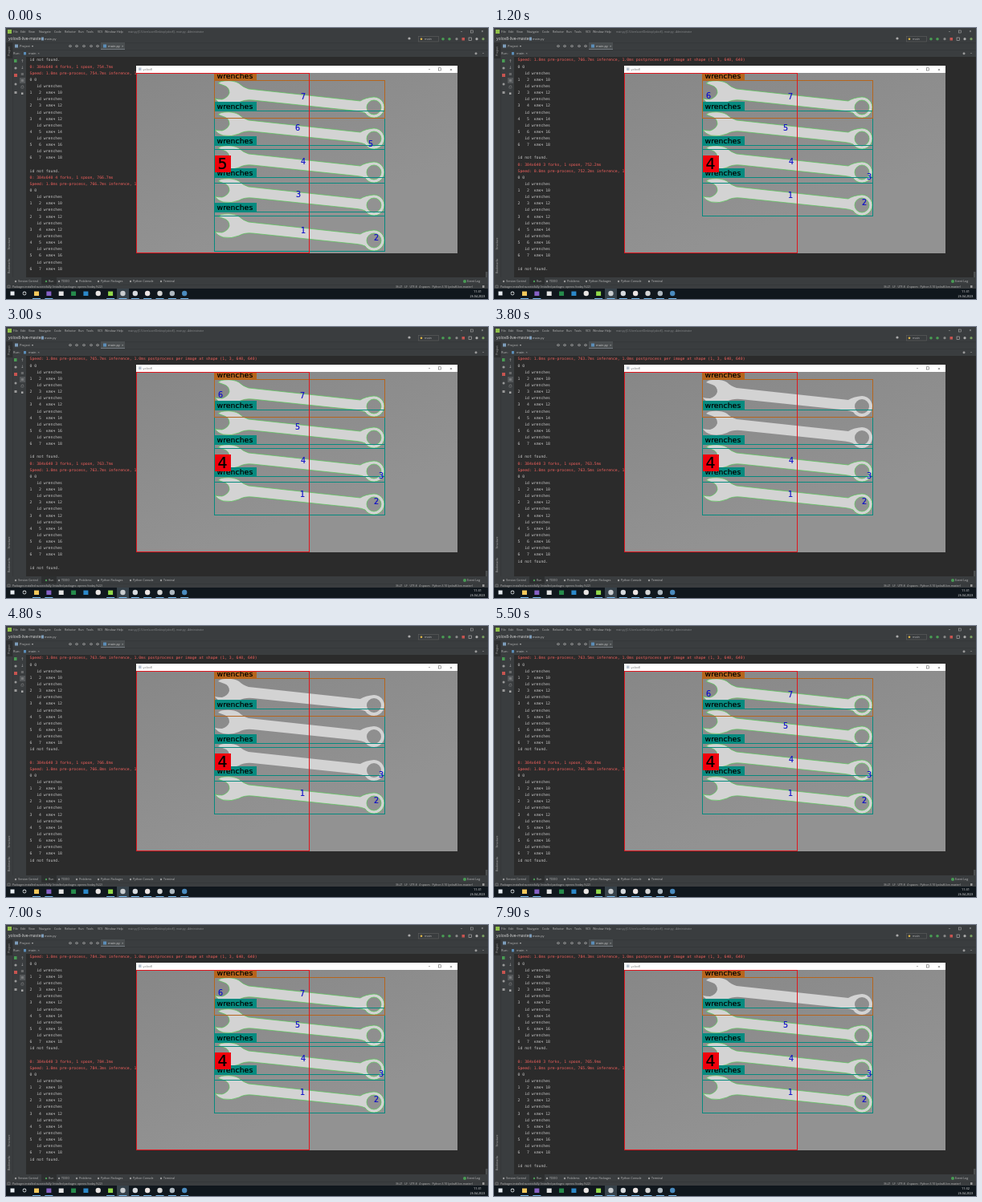
An HTML page with a canvas for the animation above (8 s loop, 600x338 px).

```html
<!DOCTYPE html>
<html>
<head>
<meta charset="utf-8">
<style>
html, body { margin: 0; width: 100%; height: 100%; overflow: hidden; background: #2b2b2b; }
canvas { display: block; }
</style>
</head>
<body>
<canvas id="stage" width="600" height="338"></canvas>
<script>
const g = document.getElementById('stage').getContext('2d');
const LOOP = 8000, CYCLE = 1020, LEAD = 360, FIND = 20;
const UI = '"Open Sans", sans-serif', MONO = '"DejaVu Sans Mono", monospace';
const PLOT = '"DejaVu Sans", sans-serif';
const TEAL = '#078a7f', ORANGE = '#b5651d', RED = '#e0161e';

// Per detection cycle: previous time, current time, blank line before "id not found."
const RUNS = [
  [754.7, 766.7, 1], [766.7, 752.2, 1], [752.2, 765.7, 1],
  [765.7, 763.7, 1], [763.7, 763.5, 0], [763.5, 766.8, 0],
  [783.9, 784.2, 0], [784.2, 784.3, 0], [784.3, 765.9, 1]
];
const KEYS = [10, 12, 12, 14, 16, 18];

// Top and bottom of each detection box
const BOXES = [[65, 112], [103, 151], [146, 193], [186, 234], [229, 278]];

// Marks in order of discovery: x, y, index of the wrench that gets outlined (-1: none)
const FIVE = [[370, 253, 4], [461, 262, -1], [364, 208, 3], [370, 167, 2], [454, 145, -1], [363, 125, 1], [370, 86, 0]];
const FOUR = [[369, 209, 3], [461, 218, -1], [467, 186, -1], [370, 167, 2], [363, 125, 1], [267, 85, -1], [369, 86, 0]];

const wrench = new Path2D('M5 4 Q8 1 13 1 Q24 0 31 4 Q36 9 43 11 L182 26 ' +
  'Q188 22 199 21 A13 13 0 1 1 188 41 Q184 39 178 38.5 L48 25 Q38 24 31 28 ' +
  'Q22 32 11 30 Q4 28 1 23 Q5 24 10 24 Q17 22 19 16 Q19 9 13 7 Z');
const hole = new Path2D('M208 34 A9 9 0 1 0 190 34 A9 9 0 1 0 208 34 Z');
const body = new Path2D();
body.addPath(wrench);
body.addPath(hole);

function rect(x, y, w, h, color) {
  g.fillStyle = color;
  g.fillRect(x, y, w, h);
}
function frame(x, y, w, h, color, line = 1) {
  g.strokeStyle = color;
  g.lineWidth = line;
  g.strokeRect(x, y, w, h);
}
function dot(x, y, r, color) {
  g.fillStyle = color;
  g.beginPath();
  g.arc(x, y, r, 0, 7);
  g.fill();
}
// y is the vertical middle of the text
function text(s, x, y, size, color, font = UI, align = 'left') {
  g.font = size + 'px ' + font;
  g.fillStyle = color;
  g.textAlign = align;
  g.textBaseline = 'alphabetic';
  g.fillText(s, x, y + size * 0.35);
}
function plotText(s, x, y, size, color, align) {
  text(s, x, y, size, color, PLOT, align);
  g.strokeStyle = color;
  g.lineWidth = 0.2;
  g.strokeText(s, x, y + size * 0.35);
}
function sideText(s, y) {
  g.save();
  g.translate(4, y);
  g.rotate(-Math.PI / 2);
  text(s, 0, 0, 3.5, '#aaa', UI, 'center');
  g.restore();
}

function chrome(time) {
  const soft = '#bbbbbb', dim = '#8c8e90', bar = '#3a3d3f';
  rect(0, 0, 600, 338, '#2b2b2b');
  rect(0, 0, 600, 36, bar);
  rect(0, 36, 25, 275, bar);
  rect(0, 18, 600, 0.5, '#313335');
  rect(0, 27, 600, 0.5, '#313335');
  rect(8, 18, 0.5, 293, '#313335');
  rect(597, 304, 2.5, 7, '#4d4f50');
  rect(2, 2, 5, 5, '#8fbf4a');
  [['File', 9], ['Edit', 18], ['View', 28], ['Navigate', 41], ['Code', 60], ['Refactor', 73], ['Run', 90],
    ['Tools', 100], ['VCS', 114], ['Window', 123], ['Help', 138]]
    .forEach(([s, x]) => text(s, x, 4.5, 3.6, soft));
  text('main.py [C:\\Users\\user\\Desktop\\yolov8] - main.py - Administrator', 152, 4.5, 3.1, dim);
  text('–', 567, 4.5, 5, soft, UI, 'center');
  frame(578.5, 3, 3, 3, soft, 0.5);
  text('×', 593, 4.5, 5, soft, UI, 'center');

  text('yolov8-live-master', 3, 13.5, 3.9, '#ddd', 'bold 3.9px "Open Sans", sans-serif');
  text('›', 41, 13.5, 4, dim);
  rect(44, 11.5, 3, 4, '#7d9dbb');
  text('main.py', 48, 13.5, 3.9, soft);
  dot(502, 13, 1.6, '#aaa');
  frame(513.5, 10.5, 25, 6.5, '#5e6060', 0.6);
  text('main', 521, 13.7, 3.8, soft);
  dot(517, 13.7, 1.3, '#e0b84a');
  dot(544, 13.7, 1.8, '#499c54');
  dot(552, 13.7, 1.8, '#499c54');
  dot(561, 13.7, 1.6, '#888');
  rect(567.5, 12, 3.5, 3.5, '#c75450');
  frame(576, 12, 3.5, 3.5, soft, 0.6);
  dot(586, 13.7, 1.6, '#aaa');
  dot(594, 13.7, 1.6, '#7a9f61');

  rect(11, 20.5, 4, 4, '#7d9dbb');
  text('Project  ▾', 17, 22.5, 4, soft);
  [80, 88, 97, 106, 114].forEach(x => {
    dot(x, 22.5, 1.6, '#bbb');
    dot(x, 22.5, 0.9, bar);
  });
  rect(118, 18, 30, 9, '#4a4e50');
  rect(118, 26, 30, 1, '#747a80');
  rect(121, 20.5, 4, 4, '#5b8db8');
  text('main.py  ×', 127, 22.5, 4, '#ccc');
  text('Run:', 9, 31.7, 4, soft);
  rect(22, 30, 3, 3.5, '#5b8db8');
  text('main  ×', 28, 31.7, 4, soft);
  dot(585, 31.7, 1.5, '#999');
  text('–', 594, 31.7, 5, soft, UI, 'center');

  rect(0, 18, 8, 20, '#2d2f30');
  sideText('Project', 29);
  sideText('Structure', 269);
  sideText('Bookmarks', 297);
  rect(10, 39, 3.5, 4, '#499c54');
  dot(12, 50, 1.6, '#999');
  rect(10, 57, 4, 4, '#c75450');
  dot(12, 70, 1.5, '#999');
  rect(10.5, 79, 3, 3, '#999');
  rect(17, 62, 7, 7, '#55585a');
  ['↑', '↓', '≡', '≡', '⎙', '▪'].forEach((s, i) =>
    text(s, 20.3, 41 + i * 8, 5, '#aaa', PLOT, 'center'));

  rect(0, 311, 600, 14, bar);
  rect(44, 311, 19, 9, '#2d2f30');
  rect(0, 320, 600, 0.5, '#313335');
  [['Version Control', 15], ['Run', 53], ['TODO', 69], ['Problems', 91], ['Python Packages', 118],
    ['Python Console', 158], ['Terminal', 196]].forEach(([s, x]) => {
    dot(x - 3, 316, 1.2, x === 53 ? '#499c54' : '#999');
    text(s, x, 316, 3.5, soft);
  });
  dot(571, 316, 2, '#499c54');
  text('Event Log', 574, 316, 3.6, soft);
  frame(2, 321, 3, 3, '#999', 0.5);
  text('Packages installed successfully: Installed packages: opencv (today 9:22)', 8, 322.6, 3.4, soft);
  text('36:21   LF   UTF-8   4 spaces   Python 3.10 (yolov8-live-master)', 485, 322.6, 3.4, soft);
  rect(593, 321, 2.5, 3, '#999');

  rect(0, 325, 600, 13, '#10171d');
  rect(138, 325, 15, 13, '#37424a');
  rect(5.5, 328.5, 5, 5, '#e8edf2');
  dot(23, 331, 2.4, '#d0d5d8');
  dot(23, 331, 1.6, '#10171d');
  ['#f3c85b', '#8661c5', '#e4e4e4', '#258b4c', '#2c88c9', '#e8e4e2', '#92d94b', '#c9cdd0',
    '#d6dade', '#ece4e2', '#d5d5d5', '#aeb8c0', '#4b8bbe'].forEach((color, i) => {
    const x = 38 + i * 15.35;
    if (i < 5 || i === 6) rect(x - 3, 328.5, 6, 5.5, color);
    else dot(x, 331, 3.2, color);
    if (i < 2 || i > 5) rect(x - 5, 337, 10, 1, '#76b9ed');
  });
  text('11:3' + (time < 7300 ? 1 : 2), 587, 328.6, 3.9, '#eee', UI, 'center');
  text('26.04.2023', 587, 334.5, 3.7, '#eee', UI, 'center');
}

const runLine = (ms, n) => `0: 384x640 ${n} forks, 1 spoon, ${ms}ms`;
const speedLine = ms => `Speed: ${ms === 752.2 ? '0.0' : '1.0'}ms pre-process, ${ms}ms inference, ` +
  '1.0ms postprocess per image at shape (1, 3, 640, 640)';

function consoleLog(k) {
  const [before, now, gap] = RUNS[k], forks = k ? 3 : 4, none = 'id not found.';
  const rows = KEYS.flatMap((size, i) => ['   id wrenches', `${i + 1}   ${i + 2}  ключ ${size}`]);
  const end = blank => blank ? ['', none] : [none, ''];
  const lines = [
    ...(k ? [] : [none, runLine(before, forks)]),
    speedLine(before), '0 0', ...rows, ...end(k ? RUNS[k - 1][2] : 1),
    runLine(now, forks), speedLine(now), '0 0', ...rows, ...end(gap)
  ];
  lines.slice(0, 33).forEach((s, i) =>
    text(s, 29.5, 39.8 + i * 8.13, 4.8, /^(0:|Speed)/.test(s) ? '#f0605d' : '#c4c4c4', MONO));
}

function viewer(k, found) {
  const count = k ? 4 : 5, marks = (k ? FOUR : FIVE).slice(0, found);
  rect(162, 47, 400, 234, '#fff');
  rect(165, 49.5, 3.5, 3.5, '#b9c4d0');
  text('yolov8', 170.5, 51.5, 3.8, '#777');
  text('–', 527, 51.5, 5, '#444', UI, 'center');
  frame(538.5, 49.8, 3.2, 3.2, '#444', 0.5);
  text('×', 554, 51.5, 6, '#444', UI, 'center');

  g.save();
  g.beginPath();
  g.rect(162, 56, 400, 225);
  g.clip();
  const shade = g.createLinearGradient(162, 56, 240, 281);
  shade.addColorStop(0, '#878787');
  shade.addColorStop(1, '#929292');
  rect(162, 56, 400, 225, shade);

  const boxes = BOXES.slice(0, count);
  boxes.forEach(([, bottom], i) => {
    g.save();
    g.translate(259, bottom - 47);
    g.fillStyle = '#d3d3d3';
    g.fill(body, 'evenodd');
    if (marks.some(m => m[2] === i)) {
      g.strokeStyle = '#55c855';
      g.lineWidth = 0.7;
      g.stroke(body);
    }
    g.restore();
  });
  for (let i = count - 1; i >= 0; i--) {
    const [top, bottom] = boxes[i], color = i ? TEAL : ORANGE;
    frame(259.5, top + 0.5, 212, bottom - top, color);
    rect(259, top - 11, 53, 11.5, color);
    plotText('wrenches', 262.5, top - 5.7, 9.4, '#000');
  }
  frame(162.5, 56.5, 215, 224, RED);
  rect(260, 159, 20, 21, '#f0000c');
  plotText(count, 269.5, 169.7, 19, '#000', 'center');
  marks.forEach(([x, y], i) => plotText(i + 1, x, y, 9.6, '#1010c8', 'center'));
  g.restore();
}

function draw(now) {
  const time = now % LOOP, shifted = time + LEAD;
  const k = Math.min(RUNS.length - 1, Math.floor(shifted / CYCLE));
  const found = Math.min(7, Math.floor((shifted - k * CYCLE) / FIND));
  chrome(time);
  consoleLog(k);
  viewer(k, found);
  requestAnimationFrame(draw);
}
requestAnimationFrame(draw);
</script>
</body>
</html>
```
